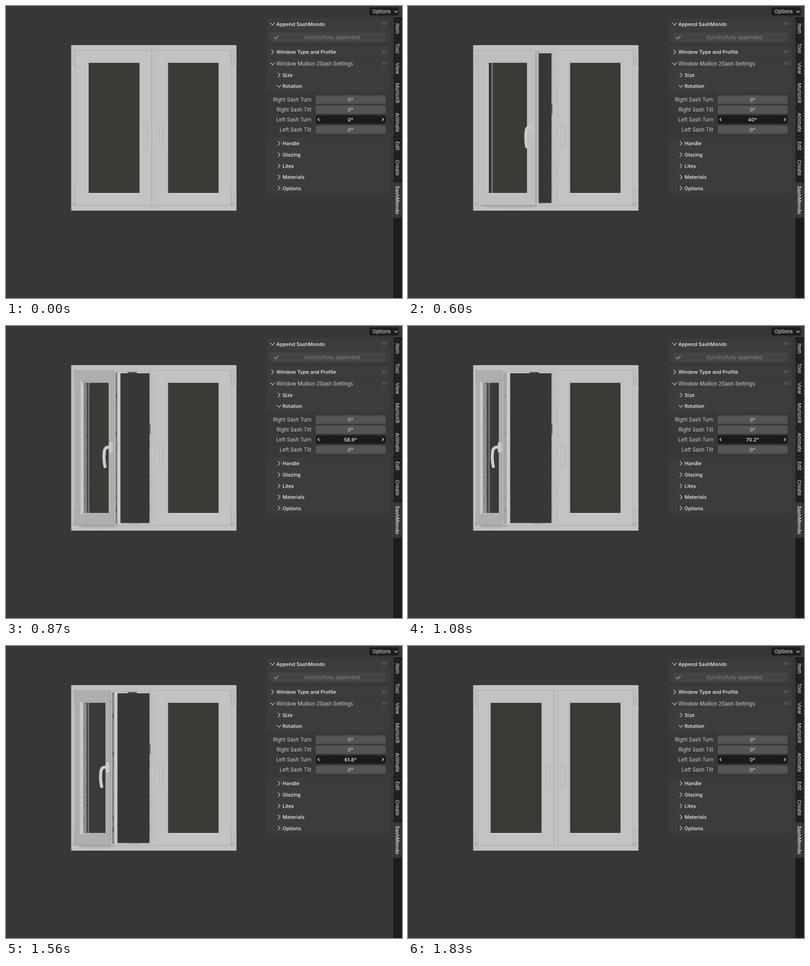
These frames come from a looping animation (872x642 px, 1.86 s). An HTML page with a canvas:

```html
<!DOCTYPE html>
<html lang="en">
<head>
<meta charset="utf-8">
<title>Window sash rotation</title>
<style>
  html, body { margin: 0; width: 100%; height: 100%; overflow: hidden; background: #373737; }
  canvas, svg { position: absolute; left: 0; top: 0; width: 872px; height: 642px; }
  text { font: 11px Inter, "Open Sans", sans-serif; fill: #e6e6e6; white-space: pre; }
  .title { font-weight: 500; fill: #f0f0f0; }
  .dim { font-size: 11.35px; fill: #cccccc; }
  .off { fill: #868686; }
</style>
</head>
<body>
<canvas id="view" width="872" height="642"></canvas>
<svg id="ui" viewBox="0 0 872 642"></svg>
<script>
const LOOP = 1860, STEP = 30;
const KEYS = [[0, 0], [120, 0], [150, 0.6], [300, 6.5], [450, 18.4], [600, 40], [690, 48], [870, 58.9],
  [1080, 70.2], [1110, 70.2], [1290, 77], [1380, 76], [1560, 61.8], [1680, 38], [1800, 8], [1830, 0], [LOOP, 0]];

// ---------- side panel ----------
const ui = document.getElementById('ui');

function add(tag, attrs, body) {
  const el = document.createElementNS('http://www.w3.org/2000/svg', tag);
  for (const k in attrs) el.setAttribute(k, attrs[k]);
  if (body) el.textContent = body;
  ui.appendChild(el);
  return el;
}
function box(x, y, w, h, fill, r = 0, stroke = 'none') {
  add('rect', { x, y, width: w, height: h, rx: r, fill, stroke });
}
function label(x, y, body, kind = 'title', anchor = 'start') {
  return add('text', { x, y: y + 4, 'text-anchor': anchor, class: kind }, body);
}
function line(d, width = 1.3, stroke = '#c4c4c4') {
  add('path', { d, fill: 'none', stroke, 'stroke-width': width, 'stroke-linecap': 'round', 'stroke-linejoin': 'round' });
}
function chevron(x, y, open) {
  line(open ? `M${x - 4.5} ${y - 2}l4.5 4.5l4.5 -4.5` : `M${x - 2} ${y - 4.5}l4.5 4.5l-4.5 4.5`);
}
function dots(y) {
  for (let i = 0; i < 8; i++) box(828 + (i % 4) * 2.8, y - 2 + (i >> 2) * 3, 1.3, 1.3, '#969696');
}
function header(y, name, open, kind) {
  chevron(587, y, open);
  label(595.5, y, name, kind);
  dots(y - 1);
}

box(800, 3, 65, 18, '#1d1d1d', 4);
label(807, 12, 'Options', '');
line('M855.8 11l3.2 3.2l3.2 -3.2', 1.4, '#d0d0d0');

box(574, 27, 271, 56, '#3c3c3c', 3);
box(574, 88, 271, 25, '#3c3c3c', 3);
box(574, 115, 271, 297, '#3c3c3c', 3);
box(574, 188, 271, 101, '#383838');

header(39.5, 'Append SashMondo', true);
box(583.5, 59.5, 252, 18, '#444444', 3, '#494949');
line('M590.5 69.5l3 3l6 -6.5', 2.2, '#8a8a8a');
label(718, 68.5, 'Successfully Appended', 'off', 'middle');
header(101, 'Window Type and Profile', false);
header(127, 'Window Mullion 2Sash Settings', true, 'dim');

[['Size', 152], ['Rotation', 176], ['Handle', 302], ['Glazing', 327], ['Lites', 351.5],
  ['Materials', 376], ['Options', 400.5]].forEach(([name, y]) => {
  chevron(601, y, name === 'Rotation');
  label(609, y, name);
});

const fields = ['Right Sash Turn', 'Right Sash Tilt', 'Left Sash Turn', 'Left Sash Tilt'].map((name, i) => {
  const y = 205.5 + i * 22, active = i === 2;
  label(672.5, y, name, 'dim', 'end');
  box(682, y - 9, 154, 18.5, active ? '#1b1b1b' : '#545454', 4);
  if (active) {
    line(`M689.5 ${y - 2.8}l-2.8 2.8l2.8 2.8`, 1.5, '#e6e6e6');
    line(`M828.5 ${y - 2.8}l2.8 2.8l-2.8 2.8`, 1.5, '#e6e6e6');
  }
  return label(758.5, y, '0°', active ? 'title' : '', 'middle');
});
const turn = fields[2];

box(853, 25, 19, 617, '#1c1c1c');
[['Item', 30, 69], ['Tool', 74, 112], ['View', 117, 157], ['MurloXR', 161, 222], ['Animate', 226, 286],
  ['Edit', 290, 325], ['Create', 330, 381], ['SashMondo', 387, 466]].forEach(([name, a, b], i) => {
  const on = i === 7;
  box(853.5, a + 0.5, 17, b - a - 1, on ? '#383838' : '#202020', 3, on ? '#383838' : '#303030');
  add('text', { transform: `translate(857.5 ${(a + b) / 2}) rotate(90)`, 'text-anchor': 'middle',
    class: on ? 'title' : '' }, name);
});

// ---------- window ----------
const g = document.getElementById('view').getContext('2d');
const BODY = '#c3c1bf', GLASS = '#3a3a37';

const mix = (a, b, t) => a + (b - a) * Math.max(0, Math.min(1, t));
const grey = v => `rgb(${v | 0},${v | 0},${(v - 2) | 0})`;

function fill(x0, y0, x1, y1, color) {
  if (x1 <= x0) return;
  g.fillStyle = color;
  g.fillRect(x0, y0, x1 - x0, y1 - y0);
}
function edge(x0, y0, x1, y1, color) {
  g.strokeStyle = color;
  g.lineWidth = 1;
  g.strokeRect(x0, y0, x1 - x0, y1 - y0);
}
function grain(x0, x1, y0, y1, n, color) {
  let seed = 7;
  const rnd = () => (seed = seed * 16807 % 2147483647) / 2147483647;
  g.fillStyle = color;
  if (x1 > x0) for (let i = 0; i < n; i++) g.fillRect(mix(x0, x1 - 1, rnd()), mix(y0, y1 - 2, rnd()), 1, 1 + rnd() * 2);
}
function hinge(x, dir) {
  for (const [a, b] of [[98, 129], [404, 438]]) edge(x, a, x + 5, b, 'rgba(120,118,116,.3)');
  edge(x + dir, 433, x + dir + 5.5, 437.5, 'rgba(110,108,106,.4)');
  edge(x + dir, 124, x + dir + 5.5, 128.5, 'rgba(110,108,106,.25)');
}

// Face with a glazed hole; bl and br are the outer edges of the bevel.
function sash(x0, x1, h0, h1, bl, br, tone) {
  g.fillStyle = grey(tone);
  g.beginPath();
  g.rect(x0, 98, x1 - x0, 340);
  g.rect(h0, 125, h1 - h0, 286);
  g.fill('evenodd');
  const trim = (pts, color) => {
    g.fillStyle = color;
    g.beginPath();
    pts.forEach(p => g.lineTo(...p));
    g.fill();
  };
  trim([[bl, 121], [br, 121], [h1, 125], [h0, 125]], grey(tone - 6));
  trim([[bl, 415], [br, 415], [h1, 411], [h0, 411]], grey(tone + 5));
  trim([[bl, 121], [h0, 125], [h0, 411], [bl, 415]], grey(mix(191, 200, (195 - tone) / 20)));
  if (br > h1) trim([[br, 121], [h1, 125], [h1, 411], [br, 415]], grey(tone - 1));
  edge(x0 + 0.5, 98, x1 - 0.5, 438, 'rgba(130,128,126,.22)');
}

function handle(x, s) {
  const at = d => x - d * s;
  const grip = (w, color) => {
    g.lineWidth = w;
    g.strokeStyle = color;
    g.beginPath();
    g.moveTo(at(-1), 267);
    g.bezierCurveTo(at(9), 265, at(15), 267, at(16), 278);
    g.quadraticCurveTo(at(18), 293, at(14), 309);
    g.stroke();
  };
  g.lineCap = g.lineJoin = 'round';
  g.fillStyle = grey(mix(195, 202, s));
  g.strokeStyle = 'rgba(110,108,106,.13)';
  g.lineWidth = 1;
  g.beginPath();
  g.roundRect(x - 5.5 + 2 * s, 255, 11 - 2 * s, 24, 5);
  g.fill();
  g.stroke();
  const w = mix(9.5, 6, s);
  grip(w + 0.5, grey(mix(175, 185, s)));
  grip(w - 1.5 + s, grey(mix(194, 206, s)));
}

function opening() {
  fill(156, 100, 319, 435, '#c6c5c3');
  edge(156.5, 100.5, 318.5, 434.5, '#a9a7a5');
  fill(160, 104, 316, 433, '#343434');
  fill(160, 106, 313, 430, '#373737');
  grain(314, 318, 102, 434, 70, 'rgba(90,88,84,.5)');
  fill(314, 216, 317.5, 237, '#4a4740');
  fill(268, 101.5, 288, 104.5, '#44433f');
  fill(274, 432.5, 296, 434.5, '#8b8a87');
}

function shadow(x0, x1) {
  const sh = g.createLinearGradient(0, 438, 0, 446);
  sh.addColorStop(0, 'rgba(90,88,86,.25)');
  sh.addColorStop(1, 'rgba(90,88,86,0)');
  g.fillStyle = sh;
  g.beginPath();
  g.ellipse((x0 + x1) / 2, 438, (x1 - x0) / 2, 8, 0, 0, Math.PI);
  g.fill();
}

function drawWindow(deg) {
  const a = deg * Math.PI / 180, c = Math.cos(a), s = Math.sin(a);
  const at = (w, d) => 145 + w * c + d * s;
  const tone = deg < 40 ? mix(195, 191, deg / 40) : mix(191, 174, (deg - 40) / 20);

  g.clearRect(0, 0, 872, 642);
  fill(143.5, 86, 507.5, 450, BODY);
  fill(146, 96.5, 505, 98, 'rgba(130,128,126,.14)');
  fill(154, 438, 497, 439.5, 'rgba(120,118,116,.2)');
  hinge(149.5, -1);
  hinge(497, 0);

  // fixed right sash
  fill(357, 125, 468, 411, GLASS);
  sash(329.5, 495.5, 357, 468, 353, 472, 195);
  handle(342, 0);

  if (deg > 2) {
    opening();
    shadow(at(14, 8), at(166, 20));
  }

  const x0 = at(9, 2.4), x1 = at(176, 2.4);
  const h0 = Math.round(at(37, 8)), h1 = Math.round(at(149, 4.5));

  // free edge: rear rebate, fitting groove, front lip
  const lip = at(176, 6), groove = at(164.4, 17.6), back = at(164.4, 25.8);
  if (back > lip) {
    const wear = mix(0.65, 0.1, (deg - 59) / 11);
    fill(lip, 102, back, 435, '#cbcac8');
    fill(lip, 102, groove, 435, grey(mix(125, 168, (deg - 60) / 10)));
    if (groove > lip) {
      for (const y of [150, 232, 374, 400]) fill(lip + 1, y, groove - 1, y + 9, `rgba(70,68,64,${wear})`);
      grain(lip, groove, 104, 434, 50, `rgba(60,58,54,${wear})`);
    }
    fill(lip, 102, lip + 0.7, 435, '#8a8885');
  }
  fill(x1, 98, lip, 438, grey(mix(196, 190, deg / 70)));

  // glass and the reveal behind it
  fill(h0, 125, h1, 411, GLASS);
  const reveal = Math.min(at(33.5, 25.5), h1);
  if (reveal > h0 && deg > 3) {
    const mid = mix(h0, reveal, 0.55);
    fill(h0, 125, reveal, 411, deg < 30 ? '#1e1e1d' : '#454441');
    if (deg > 30) {
      fill(h0, 125, mid, 411, grey(mix(45, 145, (deg - 38) / 24)));
      grain(h0, reveal, 125, 411, 130, 'rgba(60,58,54,.5)');
      fill(reveal - 2.5, 125, reveal - 1, 411, '#a4a29f');
    }
  }
  sash(x0, x1, h0, h1, at(33, 2.4), at(153, 2.4), tone);
  fill(x1 - 0.5, 98, x1 + 0.5, 438, 'rgba(120,118,116,.3)');
  handle(at(163, 1), s);
}

// ---------- timing ----------
function angleAt(t) {
  const i = KEYS.findIndex(k => k[0] > t);
  const [t0, v0] = KEYS[i - 1], [t1, v1] = KEYS[i];
  return mix(v0, v1, (t - t0) / (t1 - t0));
}
function frame() {
  const t = Math.floor(performance.now() % LOOP / STEP) * STEP;
  const deg = Math.round(angleAt(t) * 10) / 10;
  drawWindow(deg);
  turn.textContent = deg + '°';
  requestAnimationFrame(frame);
}
frame();
</script>
</body>
</html>
```
